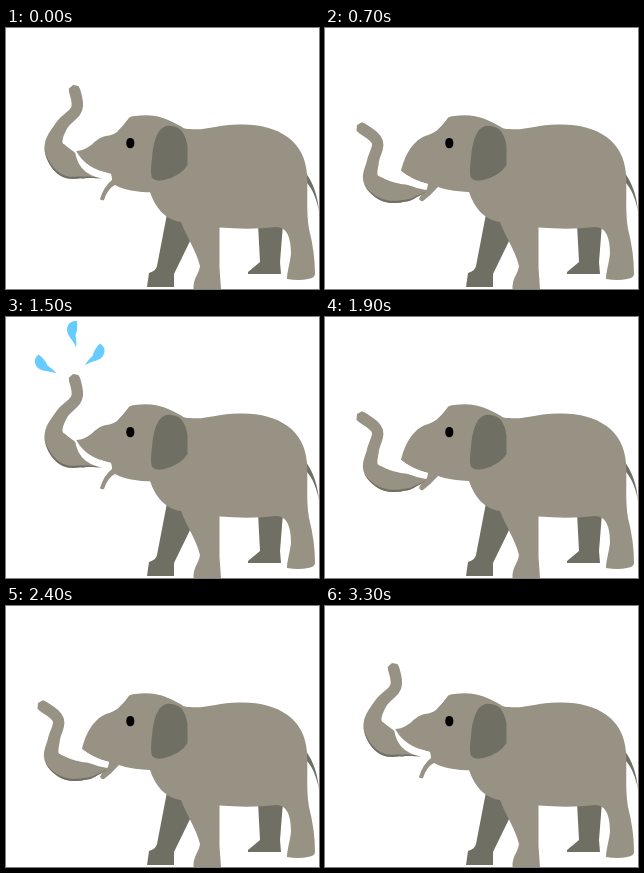
Recreate the animation shown at these times as an HTML page. Size 313 by 261 pixels, loop 3.4 s.

```html
<!DOCTYPE html>
<html lang="en">
<head>
<meta charset="utf-8">
<title>Elephant</title>
<style>
  html, body { margin: 0; width: 100%; height: 100%; overflow: hidden; background: #fff; }
  svg { display: block; width: 313px; height: 261px; }
  .skin { fill: #989284; }
  .dark { fill: #706f64; }
  .water { fill: #66ccff; }
</style>
</head>
<body>
<svg viewBox="0 0 313 261">
  <g class="dark">
    <path d="M161 186L151 238Q150 243 143 245L141 259H168V246L186 209L176 190Z"/>
    <path d="M252 196L254 234L242 244V246H275L274 234L277 196Z"/>
    <path d="M300 145C307 155 312 168 313 184C311 172 307 162 301 155Z"/>
  </g>
  <path class="skin" d="M112 103Q119 96 123 90Q125 88 129 88C148 85 161 90 176 99Q178 101 184 101C200 103 213 96 235 96.500C272 96 299 113 301 146C302 166 300 184 303 201Q309 224 309 246Q309 250 302 251Q293 253 281 251C281 244 284 235 285 226C285 214 283 199 270 199Q245 202 213.500 199.500V240L215 261H187.500C187 250 193 246 194 238C190 222 180 208 175 194C159 192 149 179 144 164L118 150Z"/>
  <path id="muzzle" class="skin"/>
  <path id="trunk" class="skin"/>
  <path id="shade" class="dark"/>
  <path id="tusk" fill="#fff"/>
  <path class="dark" d="M160 98Q168 97 175 102Q180 108 181.500 118V137Q175 148 158 152Q150 154 146 150Q144 145 146 130Q148 102 160 98Z"/>
  <rect x="120.300" y="110" width="8" height="10.300" rx="3.800" ry="4.500"/>
  <g id="spray" class="water"></g>
</svg>
<script>
const LOOP = 1700, STEP = 100;
const SPRAY_START = 10, SPRAY_END = 16;

// Trunk centre lines from mouth to tip: raised, half lowered, reaching out
const spines = [
  [[97, 148], [78, 141], [60, 135], [48, 117], [56, 97], [71, 80], [67, 57]],
  [[101, 161], [82, 165], [61, 163], [46, 151], [48, 133], [52, 113], [32, 97]],
  [[98, 163], [82, 165], [62, 164], [46, 158], [32, 149], [18, 138], [1, 131]]
];
const bulges = [8, 5, 4];

// Mouth parts, raised and lowered
const muzzles = [
  "M124 89C113 103 110 107 100 108C88 110 86 122 70 123Q80 140 105 146L106 152Q98 158 94 171Q95 173 98 172Q102 160 109 157Q125 166 160 164Z",
  "M124 89C113 103 110 105 100 108C86 114 79 130 76 143Q87 152 103 156L102 161Q96 166 94 171Q96 174 98 173Q106 167 113 159Q128 165 160 164Z"
];
const tusks = [
  "M70 123Q80 141 105 146L106 152Q72 150 69 123Z",
  "M76 143Q87 152 103 156L101 162Q82 159 71 149Z"
];

const $ = id => document.getElementById(id);
const setPath = (el, d) => el.setAttribute("d", d);
const clamp = (v, lo, hi) => Math.max(lo, Math.min(hi, v));
const mix = (a, b, k) => a + (b - a) * k;

function mixPath([a, b], k) {
  const ends = b.match(/\d+/g);
  let i = 0;
  return a.replace(/\d+/g, n => mix(+n, +ends[i++], k) + " ");
}

// Point and outward normal on a smooth curve through the spine points
function along(spine, t) {
  const last = spine.length - 1;
  const i = Math.min(Math.floor(t * last), last - 1);
  const u = t * last - i;
  const at = n => spine[clamp(n, 0, last)];
  const pos = [], dir = [];
  for (const axis of [0, 1]) {
    const [a, b, c, d] = [-1, 0, 1, 2].map(n => at(i + n)[axis]);
    const p = (c - a) / 2, q = a - 2.5 * b + 2 * c - d / 2, r = (d - a + 3 * (b - c)) / 2;
    pos.push(b + u * (p + u * (q + u * r)));
    dir.push(p + u * (2 * q + 3 * u * r));
  }
  const len = Math.hypot(...dir);
  return { pos, normal: [dir[1] / len, -dir[0] / len] };
}

// Band along the spine between two offsets given as functions of t
function band(spine, end, outer, inner) {
  const edge = side => Array.from({ length: 41 }, (_, n) => {
    const t = end * n / 40;
    const { pos, normal } = along(spine, t);
    return pos.map((v, axis) => (v + normal[axis] * side(t)).toFixed(2));
  });
  return "M" + [...edge(outer), ...edge(inner).reverse()].join("L") + "Z";
}

function drawTrunk(pose) {
  const i = Math.min(Math.floor(pose), spines.length - 2), k = pose - i;
  const spine = spines[i].map((p, n) => p.map((v, axis) => mix(v, spines[i + 1][n][axis], k)));
  const bulge = mix(bulges[i], bulges[i + 1], k);
  const width = t => {
    const root = Math.min(1, .4 + 4 * t);
    const tip = Math.sqrt(1 - clamp((t - .95) / .05, 0, 1) ** 2);
    return (5.7 + bulge * Math.exp(-(((t - .33) / .2) ** 2))) * root * tip;
  };
  setPath($("trunk"), band(spine, 1, width, t => -width(t)));
  setPath($("shade"), band(spine, .5, width, t => width(t) - 2.2 * Math.sin(Math.PI * t / .5)));
}

// Drops leave the tip one after another: left, right, then straight up
const drops = [-1, 1, 0].map((side, i) => {
  const el = document.createElementNS("http://www.w3.org/2000/svg", "path");
  setPath(el, "M5 -13C-1 -14 -5 -10 -5 -4C-4 3 1 5 4 13Q5 9 3.500 1Q6 -5 5 -13Z");
  $("spray").append(el);
  return { el, side, lift: 1 - Math.abs(side), first: SPRAY_START + i };
});

function drawDrop({ el, side, lift, first }, step) {
  const age = step - first;
  el.style.display = age >= 0 && step < SPRAY_END ? "" : "none";
  const x = 66 + side * (9.7 + 3.6 * age);
  const y = 44 - 8 * lift - (10 + 3 * lift) * age + 2.25 * age * age;
  el.setAttribute("transform",
    `translate(${x} ${y}) rotate(${side * age * 9}) scale(${side > 0 ? -1 : 1} 1)`);
}

function draw(step) {
  // Quick swing out, slower return
  const pose = Math.max(0, Math.min(step / 2, (SPRAY_START - step) / 3));
  const mouth = Math.min(1, pose);
  drawTrunk(pose);
  setPath($("muzzle"), mixPath(muzzles, mouth));
  setPath($("tusk"), mixPath(tusks, mouth));
  drops.forEach(drop => drawDrop(drop, step));
}

const start = performance.now();
let shown = -1;
function tick() {
  const step = Math.floor((performance.now() - start) % LOOP / STEP);
  if (step !== shown) draw(shown = step);
  requestAnimationFrame(tick);
}
tick();
</script>
</body>
</html>
```
